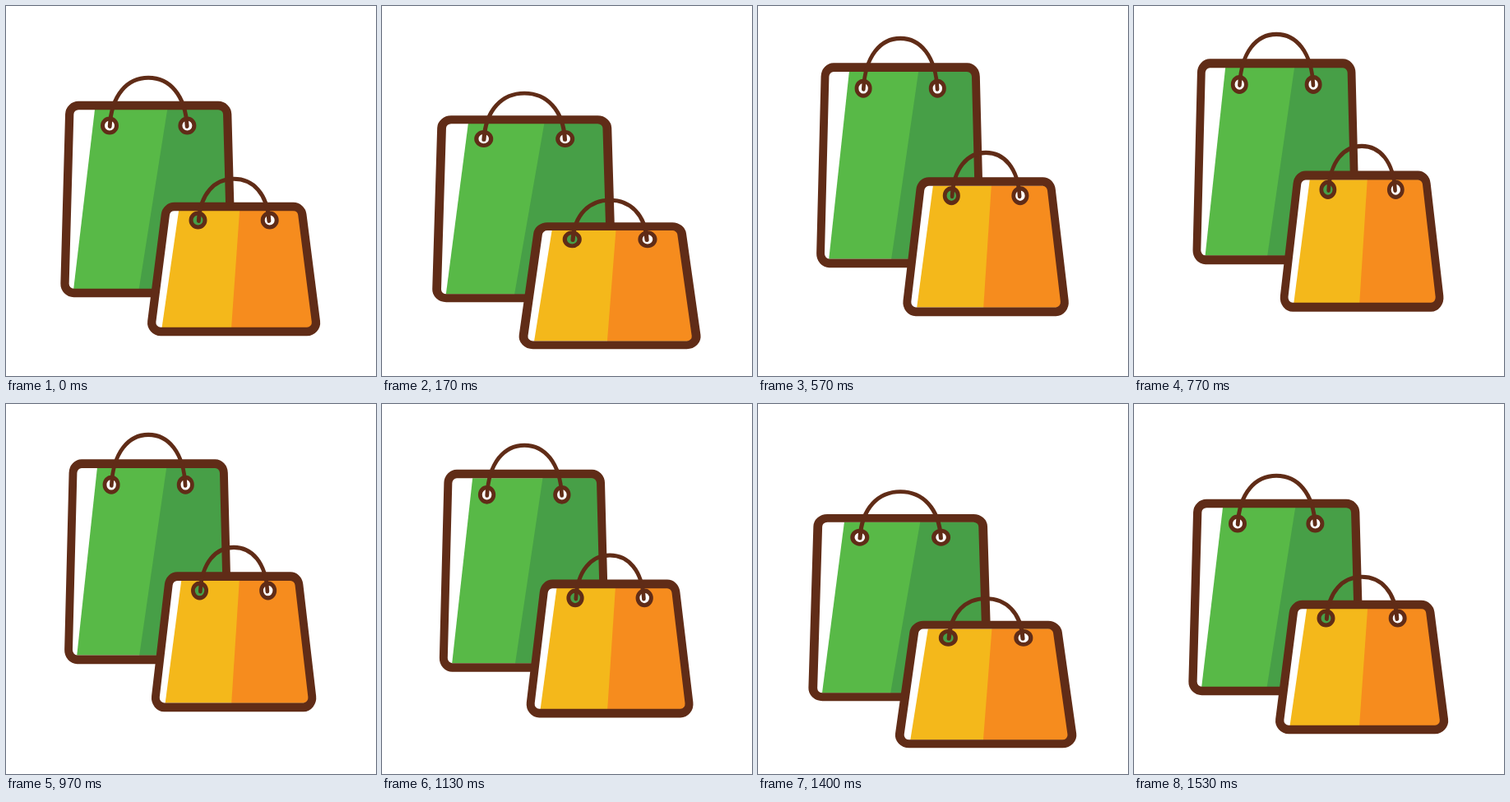
Write an HTML page with a canvas that moves like this. It is 450 by 450 pixels and loops after 1.56 s.

```html
<!DOCTYPE html>
<html lang="en">
<head>
<meta charset="utf-8">
<title>Jumping shopping bags</title>
<style>
  html, body { margin: 0; width: 100%; height: 100%; overflow: hidden; background: #fff; }
  canvas { display: block; width: 450px; height: 450px; }
</style>
</head>
<body>
<canvas id="stage" width="450" height="450"></canvas>
<script>
const ctx = document.getElementById('stage').getContext('2d');
const LOOP = 1560, STEP = 100 / 3, LAST_STEP = 46;
const BROWN = '#602c17';

// Poses (in steps): rest, crouch, rise, peak, fall, crouch, rest.
const KEYS = [0, 5, 11, 17, 23, 29, 32, 39, 42, 46];

// Lengths are measured from the bag's centre line and its outer bottom edge.
const bags = [
  {
    x: 173.2, bodyTop: -233, halfTop: 95.7, halfBottom: 102, radius: 11,
    eyeX: 47.2, eyeY: -208.5, handleX: 47, handleY: -266.7,
    light: '#58b947', dark: '#479f47', holes: ['#fff', '#fff'],
    lightEdge: [-65.2, -91], darkEdge: [23, -11.5],
    tops: [85, 104, 61.5, 37, 32, 35, 40, 80, 104.5, 85],
    bottoms: [354, 360, 336, 318, 314, 316, 320, 347, 361, 354]
  },
  {
    x: 277.1, bodyTop: -157, halfTop: 82, halfBottom: 101.4, radius: 11,
    eyeX: 43.6, eyeY: -140.5, handleX: 42.8, handleY: -190.7,
    light: '#f4b81b', dark: '#f68c1e', holes: ['#479f47', '#fff'],
    lightEdge: [-67, -87.5], darkEdge: [7, -3],
    tops: [208, 234, 193, 176, 168, 172, 177, 199.5, 234.5, 208],
    bottoms: [401, 417, 388, 377, 371.5, 374, 378, 393.5, 418, 401]
  }
];

// Smooth interpolation that never overshoots the keyed values.
function sample(values, step) {
  const slope = i => (values[i + 1] - values[i]) / (KEYS[i + 1] - KEYS[i]);
  const tangent = i => {
    if (i === 0 || i === KEYS.length - 1) return 0;
    const a = slope(i - 1), b = slope(i);
    return a * b > 0 ? 2 * a * b / (a + b) : 0;
  };
  let i = 0;
  while (i < KEYS.length - 2 && step >= KEYS[i + 1]) i++;
  const span = KEYS[i + 1] - KEYS[i], u = (step - KEYS[i]) / span, v = 1 - u;
  return v * v * (1 + 2 * u) * values[i] + u * u * (3 - 2 * u) * values[i + 1]
    + span * u * v * (v * tangent(i) - u * tangent(i + 1));
}

function bodyPath({ bodyTop, halfTop, halfBottom, radius }) {
  ctx.beginPath();
  ctx.moveTo(0, bodyTop);
  ctx.arcTo(halfTop, bodyTop, halfBottom, -5, radius);
  ctx.arcTo(halfBottom, -5, -halfBottom, -5, radius);
  ctx.arcTo(-halfBottom, -5, -halfTop, bodyTop, radius);
  ctx.arcTo(-halfTop, bodyTop, 0, bodyTop, radius);
  ctx.closePath();
}

function fillRightOf([top, bottom], bodyTop, color) {
  ctx.beginPath();
  ctx.moveTo(top, bodyTop + 5);
  ctx.lineTo(150, bodyTop + 5);
  ctx.lineTo(150, -10);
  ctx.lineTo(bottom, -10);
  ctx.fillStyle = color;
  ctx.fill();
}

function drawBag(bag, step) {
  const top = sample(bag.tops, step), bottom = sample(bag.bottoms, step);
  const stretch = (bottom - top) / (bag.bottoms[0] - bag.tops[0]);
  ctx.save();
  ctx.translate(bag.x, bottom);
  ctx.scale(2 - stretch, stretch);
  ctx.strokeStyle = BROWN;
  ctx.lineCap = 'round';

  ctx.save();
  bodyPath(bag);
  ctx.fillStyle = '#fff';
  ctx.fill();
  ctx.clip();
  fillRightOf(bag.lightEdge, bag.bodyTop, bag.light);
  fillRightOf(bag.darkEdge, bag.bodyTop, bag.dark);
  ctx.restore();
  bodyPath(bag);
  ctx.lineWidth = 10.3;
  ctx.stroke();

  bag.holes.forEach((color, i) => {
    ctx.beginPath();
    ctx.arc(i ? bag.eyeX : -bag.eyeX, bag.eyeY, 8.5, 0, 7);
    ctx.fillStyle = color;
    ctx.fill();
    ctx.lineWidth = 5;
    ctx.stroke();
  });

  const { handleX: w, handleY: peak } = bag, end = bag.eyeY + 1;
  const shoulder = end + (peak - end) * 0.655;
  ctx.beginPath();
  ctx.moveTo(-w, end);
  ctx.bezierCurveTo(-w * 0.957, shoulder, -w * 0.54, peak, 0, peak);
  ctx.bezierCurveTo(w * 0.54, peak, w * 0.957, shoulder, w, end);
  ctx.lineWidth = 4.9;
  ctx.stroke();
  ctx.restore();
}

function render() {
  const time = performance.now() % LOOP;
  const step = Math.min(LAST_STEP, Math.floor((time + 5) / STEP));
  ctx.fillStyle = '#fff';
  ctx.fillRect(0, 0, 450, 450);
  bags.forEach(bag => drawBag(bag, step));
  requestAnimationFrame(render);
}
render();
</script>
</body>
</html>
```
